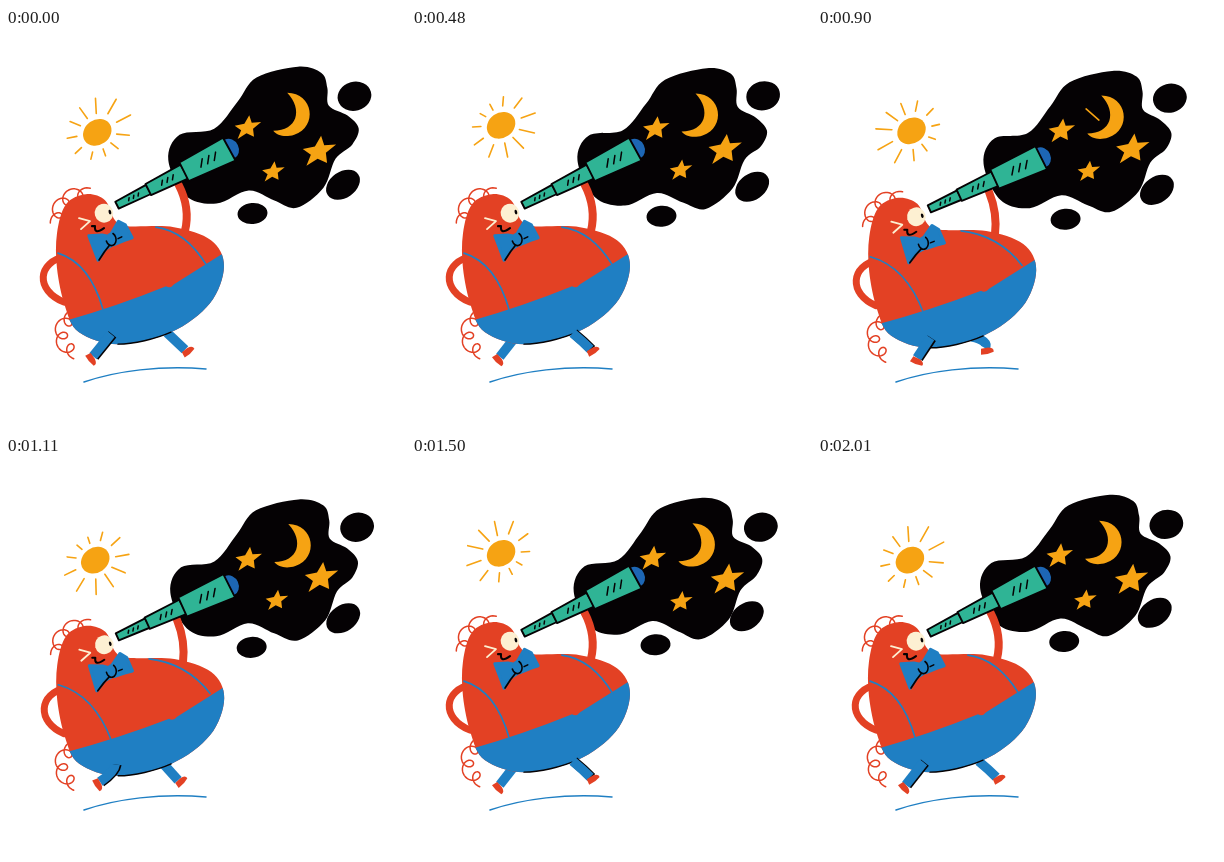
Recreate the animation shown at these times as an HTML page with a canvas. Size 400x400 px, loop 2040 ms.

```html
<!DOCTYPE html>
<html lang="en">
<head>
<meta charset="utf-8">
<title>Stargazer</title>
<style>
html, body { margin: 0; width: 100%; height: 100%; overflow: hidden; background: #fff; }
canvas { display: block; width: 100vw; height: 100vh; }
</style>
</head>
<body>
<canvas id="stage" width="400" height="400"></canvas>
<script>
const g = document.getElementById('stage').getContext('2d');
const LOOP = 2040, STRIDE = 1020, STEP = 510, TAU = Math.PI * 2;
const RED = '#e34124', BLUE = '#1f7fc3', NAVY = '#1d66b4', TEAL = '#2fb495',
  GOLD = '#f6a313', CREAM = '#fdf0d2', INK = '#050204';
const { sin, cos, max, PI } = Math;
const rad = d => d * PI / 180;

// Lean of the body during one step: w swings evenly, tilt and snap peak sharper
let w, tilt, snap;
function setPose(t) {
  w = 0.5 + 0.5 * cos(TAU * (t - 240) / STEP);
  tilt = w ** 2;
  snap = w ** 4;
}

// Carries a point of the upright figure into the current lean
function warp(x, y) {
  const dx = 10 + 0.1 * max(0, 260 - y);
  const dy = 27 * (max(0, x - 50) / 168) ** 1.5;
  return [x + dx * snap, y + dy * snap + 16 * w * (1 - w)];
}

function pairs(a) {
  const p = [];
  for (let i = 0; i < a.length; i += 2) p.push([a[i], a[i + 1]]);
  return p;
}
const bent = (...a) => pairs(a).map(p => warp(...p));

function curveTo(p, i) {
  const n = p.length, [a, b, c, d] = [-1, 0, 1, 2].map(k => p[(i + k + n) % n]);
  g.bezierCurveTo(b[0] + (c[0] - a[0]) / 6, b[1] + (c[1] - a[1]) / 6,
    c[0] - (d[0] - b[0]) / 6, c[1] - (d[1] - b[1]) / 6, c[0], c[1]);
}
function closed(p) {
  g.beginPath();
  g.moveTo(...p[0]);
  p.forEach((_, i) => curveTo(p, i));
  g.closePath();
}
function line(...a) {
  g.beginPath();
  pairs(a).forEach(p => g.lineTo(...p));
}
function arc(p) {
  g.beginPath();
  g.moveTo(...p[0]);
  if (p.length > 3) g.bezierCurveTo(...p[1], ...p[2], ...p[3]);
  else g.quadraticCurveTo(...p[1], ...p[2]);
}
function fill(c) { g.fillStyle = c; g.fill(); }
function stroke(c, width) { g.strokeStyle = c; g.lineWidth = width; g.stroke(); }
function ellipse([x, y], rx, ry, deg, c) {
  g.beginPath();
  g.ellipse(x, y, rx, ry, rad(deg), 0, TAU);
  fill(c);
}
function local([x, y], deg, draw) {
  g.save();
  g.translate(x, y);
  g.rotate(rad(deg));
  draw();
  g.restore();
}
function drift(t, x, y, r, deg) {
  const a = rad(deg) + TAU * t / LOOP;
  return [x + r * cos(a), y + r * sin(a)];
}

function sun(t) {
  const o = rad(78) + TAU * t / STRIDE;
  const x = 90.5 + 3.7 * cos(o), y = 100.7 + 3.7 * sin(o);
  ellipse([x, y], 15, 12.5, -35, GOLD);
  const long = rad(-70) - 3 * TAU * t / LOOP;
  for (let i = 0; i < 11; i++) {
    const a = rad(-93) + (i + t / LOOP) * TAU / 11;
    const axis = cos(2 * (a + rad(40)));
    const r0 = 19.5 + 2.5 * axis, r1 = 31 + 3.5 * axis + 4.5 * cos(a - long);
    line(x + r0 * cos(a), y + r0 * sin(a), x + r1 * cos(a), y + r1 * sin(a));
    stroke(GOLD, 1.6);
  }
}

// Five points, stretched a little along a rising diagonal
function star(p, r) {
  local(p, -35, () => {
    g.scale(1.13, 0.83);
    g.beginPath();
    for (let i = 0; i < 10; i++) {
      const a = rad(i * 36 - 55), q = i % 2 ? r * 0.45 : r;
      g.lineTo(q * cos(a), q * sin(a));
    }
    g.closePath();
    fill(GOLD);
  });
}

function meteor(t, mid, x, y, len) {
  const u = (t - mid) / 210 + 0.5;
  if (u <= 0 || u >= 1) return;
  const d = (u - 0.5) * 50, h = len / 2 * sin(PI * u);
  local([x, y], 41, () => { line(d - h, 0, d + h, 0); stroke(GOLD, 1.6); });
}

const CLOUD = pairs([292,39, 316,45, 322,60, 323,78, 341,88, 352,101, 346,117, 330,131, 318,160, 291,180,
  268,173, 242,163, 210,176, 180,168, 163,132, 174,107, 208,101, 231,74, 250,50]);

function sky(t) {
  closed(CLOUD.map(([x, y], i) => drift(t, x + 0.6, y + 2, 2.4, -105 - 18 * sin(i))));
  fill(INK);
  ellipse(drift(t, 350, 69.5, 2, -140), 17, 14.5, -15, INK);
  ellipse(drift(t, 337.5, 159.5, 2.8, -100), 18.5, 13, -35, INK);
  ellipse(drift(t, 246.5, 188.5, 3, -90), 15, 10.5, -5, INK);

  meteor(t, 660, 281, 156, 25);
  meteor(t, 900, 274.5, 86.5, 17);
  meteor(t, 1680, 227, 158, 15);
  star(drift(t, 242, 101.5, 1.9, -110), 13.5);
  star(drift(t, 313.6, 122.5, 1.4, 130), 17);
  star(drift(t, 268.7, 144, 1.8, 180), 11.5);
  local(drift(t, 1, 1.3, 1.8, -115), 0, () => {
    arc([[281, 65], [307, 65], [312, 99], [288, 107]]);
    g.bezierCurveTo(279, 110, 271, 108, 267, 103);
    g.bezierCurveTo(291, 103, 297, 82, 281, 65);
    fill(GOLD);
  });
}

// Curly wool: a small circle rolling along an arc
function wool([x, y], r, from, to, curls, size) {
  g.beginPath();
  for (let u = 0; u <= 1; u += 0.01) {
    const a = rad(from + (to - from) * u), b = a - TAU * curls * u;
    g.lineTo(x + r * cos(a) + size * cos(b), y + r * sin(a) + size * sin(b));
  }
  stroke(RED, 1.5);
}

function leg(t, near) {
  const a = TAU * t / STRIDE, lift = max(0, sin(a)) ** 2;
  const hx = 133 - 28 * cos(a), hy = 314 - 0.011 * (hx - 132) ** 2;
  const x = 133 - 46 * cos(a), y = 325 - 5 * sin(a - 0.7);
  const path = [[hx, hy], [(hx + x) / 2 + 24 * lift, (hy + y) / 2 - 4 * lift], [x, y]];
  g.lineCap = 'butt';
  if (near) {
    local([1.4, 0.4], 0, () => { arc(path); stroke(INK, 10); });
  }
  arc(path);
  stroke(BLUE, 9.5);
  g.lineCap = 'round';
  local([x, y], 8 + 52 * cos(a - 0.5), () => {
    line(-4, 0, 3, 0);
    g.quadraticCurveTo(9, 1, 8, 5);
    g.quadraticCurveTo(2, 7, -5, 6);
    g.closePath();
    fill(RED);
  });
}

function body() {
  const shape = bent(80,166, 60,176, 51,205, 51,240, 59,278, 73,304, 112,316, 165,304, 204,275,
    218,238, 205,212, 168,199, 122,198, 109,192, 99,172);
  closed(shape);
  fill(RED);
  g.save();
  g.clip();
  const [a, b, c] = bent(58,293, 164 + 8 * w,257 + 2 * w, 219,224 + 6 * w);
  g.beginPath();
  g.moveTo(a[0] - 15, a[1] + 4);
  g.lineTo(...a);
  g.quadraticCurveTo((a[0] + b[0]) / 2, (a[1] + b[1]) / 2 + 3, b[0] - 4, b[1] + 1);
  g.quadraticCurveTo(b[0], b[1] + 4, b[0] + 4, b[1] - 1);
  g.lineTo(...c);
  g.lineTo(260, c[1] - 20);
  g.lineTo(260, 360);
  g.lineTo(0, 360);
  fill(BLUE);
  arc(bent(52,225, 84 + 12 * w,235, 97 + 24 * w,282));
  stroke(BLUE, 1.6);
  arc(bent(150 - 20 * w,199, 180,203, 201 + 8 * w,238 - 13 * w));
  stroke(BLUE, 1.6);
  g.restore();
  g.beginPath();
  g.moveTo(...shape[6]);
  curveTo(shape, 6);
  stroke(INK, 1.4);
}

function face() {
  local(warp(98, 185), -15, () => {
    const ry = 9.5 - 5 * snap;
    ellipse([0, 0], 9.3, ry, 0, CREAM);
    ellipse([6, 0.5], 1.3, ry * 0.25, 0, INK);
  });
  local(warp(84, 193), 0, () => {
    line(-11, -3, 0, 0, -9, 8);
    stroke(CREAM, 1.8);
  });
  local(warp(87, 198), 0, () => {
    line(-1, 0, 2, 0);
    g.quadraticCurveTo(1, 9, 11, 2);
    stroke(INK, 2.1);
  });
}

function tie() {
  local(warp(105, 211), 12 * (w - 1), () => {
    g.fillStyle = BLUE;
    for (const lobe of [[-21,-8, -8,-6, -1,-3, 0,6, -8,9, -17,18], [1,-5, 11,-16, 17,-11, 21,3, 13,4, 2,6]]) {
      line(...lobe);
      g.closePath();
      fill(BLUE);
      stroke(BLUE, 3);
    }
    line(-2, 5, -9, 11, -16, 18);
    stroke(INK, 1.7);
    ellipse([0, 0], 5, 6.5, 10, BLUE);
    g.beginPath();
    g.ellipse(0, 0, 5, 6.5, 0, -0.9, 3);
    stroke(INK, 1.6);
    line(7, 1, 11, 0);
    stroke(INK, 1.5);
  });
}

function tube(x, len, h0, h1) {
  line(x, -h0, x + len, -h1, x + len + 1, h1, x, h0);
  g.closePath();
  fill(TEAL);
  stroke(INK, 1.9);
  const s = h0 * 0.33;
  for (let i = -1; i < 2; i++) {
    const c = x + len * 0.52 + i * (4 + s);
    line(c - s * 0.4, s, c + s, -s);
    stroke(INK, 1.5);
  }
}

function spyglass() {
  const deg = -26.5 + 15 * tilt, a = 35 - 6 * w, b = 40 - 3 * w, c = 50 + 2 * w;
  const [x, y] = warp(111, 177), reach = a + b - 4;
  const hand = [x + reach * cos(rad(deg)) - 2, y + reach * sin(rad(deg)) + 11];
  const shoulder = warp(179 - 10 * w * (1 - w), 203);
  const draw = () => local([x, y], deg, () => {
    ellipse([a + b + c + 1, 0], 9, 10.5, 0, NAVY);
    tube(0, a, 3.8, 5.2);
    tube(a, b, 6.2, 8);
    tube(a + b, c, 10.5, 13);
  });
  const elbow = [(shoulder[0] + hand[0]) / 2 + 9 * (1 - w), (shoulder[1] + hand[1]) / 2];
  return { draw, arm: [shoulder, elbow, hand] };
}

function draw(t) {
  g.fillStyle = '#fff';
  g.fillRect(0, 0, 400, 400);
  g.lineCap = g.lineJoin = 'round';
  setPose(t);
  const scope = spyglass();

  sky(t);
  sun(t);
  arc([[78, 354], [110, 343], [155, 337], [200, 341]]);
  stroke(BLUE, 1.5);

  wool(warp(76, 191), 26, -75, -190, 3, 6);
  wool([74, 306 + 10 * w], 19, -110, -260, 3, 6.5);
  const fold = 8 * tilt;
  arc(bent(60,228, 31 + fold,234, 29 + fold,262, 58,274));
  stroke(RED, 7);
  arc(scope.arm);
  stroke(RED, 8);
  leg(t + STEP, false);
  body();
  leg(t, true);
  face();
  tie();
  scope.draw();
}

const start = performance.now();
function tick() {
  const t = (performance.now() - start) % LOOP;
  draw(Math.floor(t / 30) * 30);
  requestAnimationFrame(tick);
}
tick();
</script>
</body>
</html>
```
